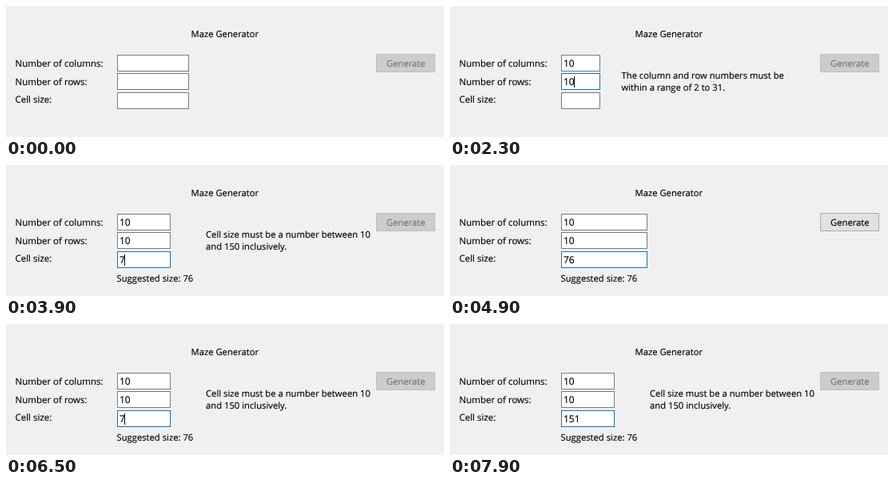
Write an HTML page that moves like this. It is 548x164 px and loops after 8 s.

```html
<!DOCTYPE html>
<html lang="en">
<head>
<meta charset="utf-8">
<title>Maze Generator</title>
<style>
  html, body { margin: 0; width: 100%; height: 100%; overflow: hidden; background: #f0f0f0; }
  svg { display: block; }
  text {
    font: 11.25px "Open Sans", "Noto Sans", sans-serif;
    text-rendering: geometricPrecision;
    white-space: pre;
    color: #000;
    fill: currentColor;
    stroke: currentColor;
    stroke-width: 0.15px;
  }
  .label { font-size: 11.5px; }
  .value { font-size: 12px; }
  .disabled { color: #757575; }
  rect { shape-rendering: crispEdges; }
</style>
</head>
<body>
<svg id="stage" width="548" height="164" viewBox="0 0 548 164"></svg>
<script>
const LOOP = 8000;
const FIELD_X = 139;
const DIGIT_WIDTH = 6.86;
const stage = document.getElementById("stage");

function add(tag, attributes, content = "") {
  const node = document.createElementNS("http://www.w3.org/2000/svg", tag);
  node.textContent = content;
  set(node, attributes);
  stage.append(node);
  return node;
}

function set(node, attributes) {
  for (const name in attributes) node.setAttribute(name, attributes[name]);
}

const addText = (x, y, content = "", className = "") =>
  add("text", { x, y, class: className }, content);

addText(231.5, 39, "Maze Generator");

const fields = [
  ["Number of columns:", 76, 61, 76],
  ["Number of rows:", 99, 84, 99],
  ["Cell size:", 121, 108, 123],
].map(([label, labelY, top, baseline]) => {
  addText(11.5, labelY, label, "label");
  return {
    box: add("rect", { x: FIELD_X + 0.5, y: top + 0.5, height: 20, fill: "#fff" }),
    value: addText(142, baseline, "", "value"),
    top,
  };
});
const caret = add("rect", { width: 1, height: 14 });
const hint = addText(138.5, 146, "Suggested size: 76");
const message = [addText(0, 91), addText(0, 106)];
const button = add("rect", { x: 463.5, y: 60.5, width: 73, height: 22 });
const buttonText = addText(476, 76, "Generate");

const layouts = {
  start: { width: 90, x: 0, lines: ["", ""] },
  range: {
    width: 49, x: 214.5,
    lines: ["The column and row numbers must be", "within a range of 2 to 31."],
  },
  suggest: { width: 108, x: 0, lines: ["", ""], hint: true },
  size: {
    width: 67, x: 250, hint: true,
    lines: ["Cell size must be a number between 10", "and 150 inclusively."],
  },
};

// Each step overrides part of the form state from its time onward.
const steps = [
  [0, { values: ["", "", ""], focus: -1, caret: false, layout: "start", ready: false }],
  [500, { focus: 0, caret: true }],
  [900, { values: ["1", "", ""] }],
  [1100, { values: ["10", "", ""] }],
  [1500, { caret: false }],
  [1900, { focus: 1, caret: true }],
  [2300, { values: ["10", "10", ""], layout: "range" }],
  [2500, { layout: "suggest" }],
  [2900, { caret: false }],
  [3300, { focus: 2, caret: true }],
  [3900, { values: ["10", "10", "7"], layout: "size" }],
  [4100, { values: ["10", "10", "76"], layout: "suggest", ready: true }],
  [4900, { caret: false }],
  [5300, { caret: true }],
  [5900, { caret: false }],
  [6300, { caret: true }],
  [6500, { values: ["10", "10", "7"], layout: "size", ready: false }],
  [6900, { values: ["10", "10", ""] }],
  [7300, { values: ["10", "10", "1"] }],
  [7500, { values: ["10", "10", "15"], layout: "suggest", ready: true }],
  [7700, { values: ["10", "10", "151"], layout: "size", ready: false }],
  [7900, { caret: false }],
];

function stateAt(time) {
  const passed = steps.filter(([start]) => start <= time);
  return Object.assign({}, ...passed.map(([, change]) => change));
}

function draw(time) {
  const state = stateAt(time);
  const layout = layouts[state.layout];

  fields.forEach(({ box, value }, i) => {
    set(box, {
      width: layout.width - 1,
      stroke: i === state.focus ? "#1f70b0" : "#7a7a7a",
    });
    value.textContent = state.values[i];
  });

  const active = fields[Math.max(state.focus, 0)];
  set(caret, {
    x: Math.floor(142 + active.value.textContent.length * DIGIT_WIDTH),
    y: active.top + 4,
    opacity: state.caret ? 1 : 0,
  });

  set(hint, { opacity: layout.hint ? 1 : 0 });
  message.forEach((line, i) => {
    set(line, { x: layout.x });
    line.textContent = layout.lines[i];
  });

  set(button, {
    fill: state.ready ? "#e1e1e1" : "#cccccc",
    stroke: state.ready ? "#adadad" : "#bfbfbf",
  });
  set(buttonText, { class: state.ready ? "" : "disabled" });
}

const begin = performance.now();
function tick() {
  draw((performance.now() - begin) % LOOP);
  requestAnimationFrame(tick);
}
tick();
</script>
</body>
</html>
```
